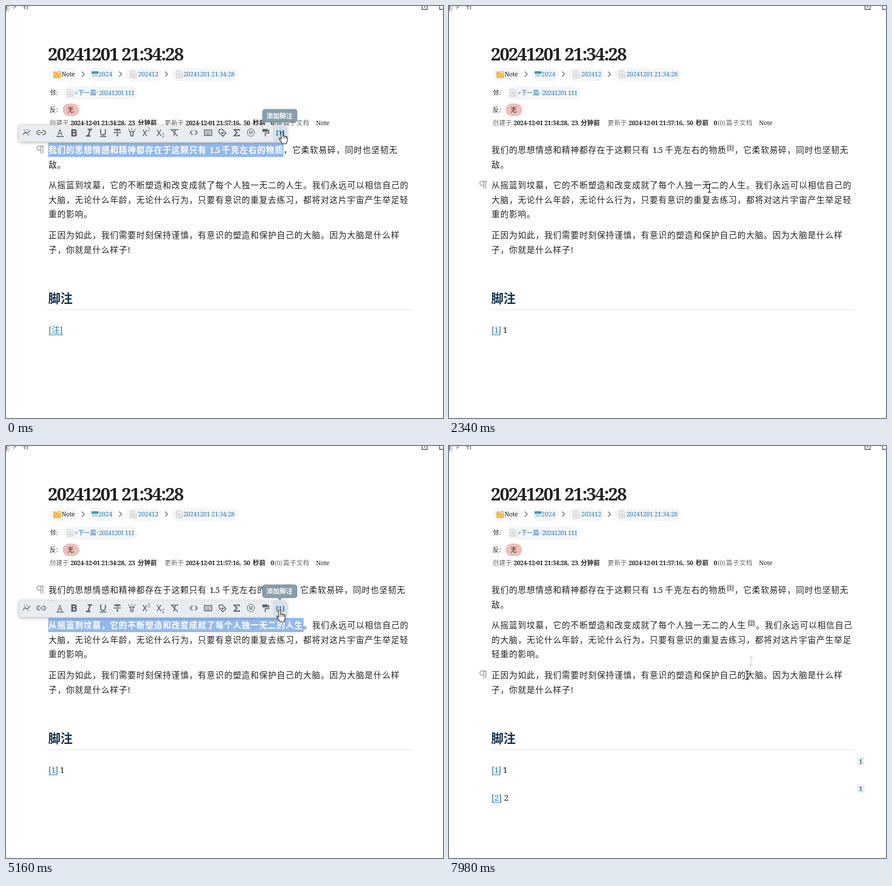
Write an HTML page that moves like this. It is 771 px wide and 726 px high and loops after 8000 ms.

```html
<!DOCTYPE html>
<html lang="zh-CN">
<head>
<meta charset="utf-8">
<title>脚注</title>
<style>
html, body { margin: 0; width: 100%; height: 100%; overflow: hidden; background: #fff; }
svg { display: block; width: 100%; height: 100%; }
text {
  font-family: 'Noto Serif', 'Noto Sans CJK SC', 'Noto Sans CJK', serif;
  white-space: pre; text-spacing-trim: space-all; user-select: none;
}
#panel { filter: drop-shadow(0 9px 14px rgba(0,0,0,.32)); }
#bar { filter: drop-shadow(0 1px 3px rgba(0,0,0,.35)); }
</style>
</head>
<body>
<svg id="stage" viewBox="0 0 771 726" lang="zh-CN"></svg>
<script>
const LOOP = 8000, PITCH = 15.5, LEFT = 75;
const INK = '#222', BLUE = '#2878b4', GREY = '#666', LINK = '#2579a8';

// y is the vertical middle of the glyphs
const txt = (x, y, s, { size = 11, fill = INK, w = 400, ls = 0, extra = '' } = {}) =>
  `<text x="${x}" y="${y + size * .37}" font-size="${size}" fill="${fill}" font-weight="${w}" letter-spacing="${ls}" ${extra}>${s}</text>`;
const rect = (x, y, w, h, fill, r = 0, extra = '') =>
  `<rect x="${x}" y="${y}" width="${w}" height="${h}" rx="${r}" fill="${fill}" ${extra}/>`;
const path = (d, stroke, w = 1.5, fill = 'none', extra = '') =>
  `<path d="${d}" fill="${fill}" stroke="${stroke}" stroke-width="${w}" ${extra}/>`;
const g = (id, body, extra = '') => `<g id="${id}" ${extra}>${body}</g>`;
const line = (x, y, s, o = {}) => txt(x, y, s, { size: 14.6, ls: .9, ...o });
const small = (x, y, s, o = {}) => txt(x, y, s, { ls: -.3, ...o });
const pill = (x, y, w) => rect(x, y, w, 23, '#f4f6f8', 11.5);

const first = '我们的思想情感和精神都存在于这颗只有';
const second = '从摇篮到坟墓，它的不断塑造和改变成就了每个人独一无二的人生';

const opening = o => line(LEFT, 254, first, o) + line(359, 254, '1.5', { ls: -.8, ...o }) + line(381, 254, '千克左右的物质', o);
const sup = (x, y, n) => rect(x, y - 7, 12.5, 13.5, '#dddfe2', 2) + txt(x + .4, y, `[${n}]`, { size: 10, ls: -.3, fill: '#333' });

const sheet = (x, y) =>
  path(`M${x} ${y - 6}h7l3 3v9h-10z`, '#b9bec4', .9, '#f3f3f1') +
  path(`M${x + 2} ${y - 2}h5M${x + 2} ${y + .5}h6M${x + 2} ${y + 3}h6`, '#a9b4bd', .8);
const chevron = x => path(`M${x - 2.5} 115.5l4.5 4.5-4.5 4.5`, '#777', 1.6);

function header() {
  return rect(-8, -12, 15, 23, '#dedede', 5) + path('M1 0v7', '#666', 1.5) +
    path('M12.5 4.5l5-4.5', '#777') +
    path('M33.5 0v6M38 0v6M33.5 1c-4 0-4-2-4-3', '#666', 1.4) +
    path('M734 -3v9h9v-9M738.5 0v3M771 6h-6v-8', '#555', 1.4) +
    txt(74, 85, '20241201 21:34:28', { size: 31, w: 700, ls: -1.85 }) +
    pill(77, 109, 51) + pill(146, 109, 48) + pill(211, 109, 63) + pill(293, 109, 116) + pill(101, 142, 131) +
    path('M84 116h5l1.5 2h6v8.500h-12.500z', '#e5a42c', .6, '#f7bd48') + path('M91 115.500h5v2', '#d9952a', 1) +
    small(98, 120, 'Note') +
    rect(151, 115, 12, 11, '#e2eaec', 1) + rect(151, 115, 12, 4.500, '#3d9bb3', 1) +
    path('M153 122.500h8', '#8f9da4', 1.500, 'none', 'stroke-dasharray="1.500 1"') +
    small(163, 120, '2024', { fill: BLUE, ls: 0 }) +
    sheet(219.5, 120.5) + small(233, 120, '202412', { fill: BLUE, ls: -.2 }) +
    sheet(300.5, 120.5) + small(313, 120, '20241201 21:34:28', { fill: BLUE }) +
    [136, 202, 283].map(chevron).join('') +
    small(77, 153, '邻:', { ls: .5 }) + sheet(108, 153) +
    small(121, 153, '&gt;下一篇·', { fill: BLUE }) + small(164, 153, '20241201 111', { fill: BLUE, ls: -.7 }) +
    small(77, 183, '反:', { ls: .5 }) + rect(100, 172, 29, 22, '#efbfba', 11) + small(108.500, 183, '无', { ls: 0 }) +
    meta(77, '创建于', '2024-12-01 21:34:28,', '23', '分钟前') +
    meta(280, '更新于', '2024-12-01 21:57:16,', '50', '秒前') +
    small(467, 205.500, '0', { w: 700 }) + small(474, 205.500, '(0)', { fill: GREY, ls: -.2 }) +
    small(489, 205.500, '篇子文档', { fill: GREY, ls: .7 }) + small(547, 205.500, 'Note');
}

function meta(x, label, date, n, unit) {
  const y = 205.5, b = { w: 700 };
  return small(x, y, label, { fill: GREY, ls: .4 }) + small(x + 37, y, date, { ...b, ls: -.42 }) +
    small(x + 139, y, n, b) + small(x + 155.5, y, unit, { ...b, ls: .3 });
}

function article() {
  const tailA = '，它柔软易碎，同时也坚韧无', tailB = '。我们永远可以相信自己';
  const mid = '大脑，无论什么年龄，无论什么行为，只要有意识的重复去练习，都将对这片宇宙产生举足';
  return opening() + g('tail1', line(0, 254, tailA)) + g('sup1', sup(490, 250, 1)) + line(LEFT, 280, '敌。') +
    line(LEFT, 316, second) +
    g('flowA', line(524.5, 316, tailB + '的') + line(LEFT, 341.5, mid + '轻') + line(LEFT, 367, '重的影响。')) +
    g('flowB', sup(527, 312, 2) + line(541.5, 316, tailB) + line(LEFT, 341.5, '的' + mid) + line(LEFT, 367, '轻重的影响。')) +
    line(LEFT, 404, '正因为如此，我们需要时刻保持谨慎，有意识的塑造和保护自己的大脑。因为大脑是什么样') +
    line(LEFT, 429.5, '子，你就是什么样子!') +
    txt(74.500, 515, '脚注', { size: 21.500, w: 700, fill: '#12304f' }) + rect(71, 534.500, 646, 1, '#e2e3e6') +
    note(1, 571) + g('row2', note(2, 619.5));
}

function note(n, y) {
  const w = n > 1 ? 18 : 16, o = { size: 14.6, fill: LINK, w: 500 };
  return g('raw' + n, txt(LEFT, y, '[注]', o) + rect(LEFT, y + 8, 26, 1, LINK)) +
    g('ref' + n, txt(LEFT, y, `[${n}]`, { ...o, ls: n > 1 ? -.2 : -.7 }) + rect(LEFT, y + 8, w, 1, LINK)) +
    g('body' + n, txt(LEFT + w + 4, y, n, { size: 14.6 })) +
    g('badge' + n, rect(720.500, y - 23, 12, 15, '#e9ecef', 3) + txt(723.300, y - 15.500, '1', { size: 11, w: 600, fill: '#2b7d8c' }));
}

function toolbar() {
  const c = '#59606a', y = 223;
  const ch = (x, s, o = {}) => txt(x, y, s, { size: 17, w: 700, fill: c, extra: 'text-anchor="middle" style="font-family:Roboto,sans-serif"', ...o });
  const ink = (d, w = 1.6) => path(d, c, w);
  return g('bar', rect(23, 210, 472, 29, '#e9edf1', 4)) +
    g('hot', rect(471, 210, 24, 29, '#d5e1ea', 4)) +
    ink('M30 227l4-5 3 3 6-6M32 218l1 2M39 228l1-2M37 217v2', 1.4) +
    ink('M60 219.500h-2a3.500 3.500 0 0 0 0 7h2M64 219.500h2a3.500 3.500 0 0 1 0 7h-2M59 223h6') +
    ch(95, 'A', { size: 14, w: 400 }) + ink('M89 230h13') +
    ch(120, 'B', { size: 18, w: 900 }) +
    path('M144 217.500h8M141 229h8M148.500 218l-3.500 11', c, 2.4) +
    path('M167 217v6a4.200 4.200 0 0 0 8.400 0v-6', c, 1.9) + ink('M165.500 230h11.500') +
    path('M191 218h11M196.500 218v3M196.500 225v4.500', c, 2.4) + ink('M190 223h13') +
    ink('M218 221h8l-2 3v5h-4v-5zM222 216v2M216 217l1.500 1.500M228 217l-1.500 1.500') +
    ch(245, 'X', { size: 15, w: 400 }) + txt(250, 218.500, '2', { size: 8, fill: c }) +
    ch(270, 'X', { size: 15, w: 400 }) + txt(275, 228.500, '2', { size: 8, fill: c }) +
    ink('M293 218h11M299 218l-3 11M291 217l12 12.500') +
    ink('M329 219l-4 4 4 4M333.500 219l4 4-4 4') +
    ink('M350 218.500h13v9.500h-13z', 1.4) + path('M352 221.500h9M352 224h9', c, 1.4, 'none', 'stroke-dasharray="1.400 1"') + ink('M353.500 226.300h6', 1) +
    ink('M376 218v5l6.500 6.500 5.500-5.500-6.500-6.500h-5z') + path('M382 226l-2.500-2.700q1-2 2.500-.4 1.500-1.600 2.500.4z', 'none', 0, c) +
    path('M411.500 220v-2h-9l5 5-5 5.500h9v-2', c, 2) +
    `<circle cx="432" cy="223" r="6.500" fill="none" stroke="${c}"/>` + ch(432, 'M', { size: 8.500, w: 400 }) +
    path('M453 217.500h8v3.500h-8z', c, 1.4, c) + ink('M461 219h2.500v5h-6v6', 1.700) +
    txt(476.300, y, '[1]', { size: 11.500, w: 700, fill: LINK, ls: -.3 });
}

const tooltip = () =>
  rect(452, 181.5, 62, 24, '#8199a7', 5) + path('M478 205h10l-5 4.500z', 'none', 0, '#8199a7') +
  txt(459.5, 193.5, '添加脚注', { size: 11.5, w: 700, fill: '#fff' });

function dialog() {
  return g('panel', rect(231, 310, 389, 248.5, '#fff', 4)) +
    txt(402, 321.500, '添加脚注', { size: 12.500, ls: .8, fill: '#333' }) + rect(231, 332, 389, 1, '#ececec') +
    path('M601 315l13 13M614 315l-13 13', '#333', 2.2) +
    rect(247, 340, 7.500, 57, '#ebebeb') +
    g('quote1', line(264, 360, first) + line(548, 360, '1.5', { ls: -.8 }) + line(569, 360, '千') + line(264, 381, '克左右的物质')) +
    g('quote2', line(264, 360, second.slice(0, 21)) + line(264, 381, second.slice(21))) +
    txt(247, 424, '脚注内容:', { size: 14.600, w: 700, ls: .6 }) +
    rect(247.500, 437.500, 356, 113, '#fff', 0, 'stroke="#858585"') +
    g('type1', txt(255, 456.5, '1', { size: 14.6 })) + g('type2', txt(255, 456.5, '2', { size: 14.6 })) +
    path('M611 557.500l7-7M615 557.500l3-3', '#555', 1.2);
}

const beam = c => path('M-3 -7.500q3 0 3 1.500q0 -1.500 3 -1.500M0 -6v12M-3 7.500q3 0 3 -1.500q0 1.500 3 1.500', c, 1.3);
const hand = path('M-1.700 11V1.500a1.700 1.700 0 0 1 3.400 0V8c.3-1.400 2.800-1.200 3 .3 .4-1.200 2.500-1 2.700.6 .5-1 2-.6 2 .9V14c0 2.600-1.400 3.600-1.700 6.800H.2C-.2 17.800-3.800 15.600-5.200 12c-.5-2 1.500-2.400 3.500.6z', '#222', 1.1, '#fff') +
  path('M1.700 8v4M4.700 8.500v3.500M7.400 9.500v2.500', '#222', .8);

const selected = (id, y, body) =>
  `<clipPath id="${id}Clip"><rect id="${id}Win" x="74.500" y="${y}" width="415" height="25"/></clipPath>` +
  g(id, g(id + 'Body', rect(0, y, 771, 25, '#94b9ec') + body, `clip-path="url(#${id}Clip)"`));
const white = { fill: '#fff', w: 700 };

document.getElementById('stage').innerHTML =
  rect(0, 0, 771, 726, '#fff') + header() + article() +
  selected('selA', 241, opening(white)) + selected('selB', 303, line(LEFT, 316, second, white)) +
  g('mark', path('M60.500 -6.500h6M61.500 -6.500v13M65 -6.500v13', '#999', 1.4) +
    path('M61.500 -6.500h-3.500a3.500 3.500 0 0 0 0 7h3.500', '#999', 1.4)) +
  g('tools', toolbar() + g('tip', tooltip(), 'opacity=".94"')) +
  g('dim', rect(0, 0, 771, 726, '#000', 0, 'opacity=".105"')) + g('dialog', dialog()) +
  g('trace', beam('#000'), 'transform="translate(533 379)" opacity=".17"') +
  g('cursor', '<circle id="press" cx="1" cy="0" r="11.500" fill="#f2ec1c" opacity=".8"/>' + g('hand', hand) + g('beam', beam('#222')));

const el = {};
document.querySelectorAll('[id]').forEach(n => el[n.id] = n);
const show = (id, on) => { el[id].style.display = on ? '' : 'none'; };
const within = (t, ...spans) => spans.some(([a, b]) => t >= a && t < b);
const ramp = (t, a, b) => { const k = Math.min(1, Math.max(0, (t - a) / (b - a))); return k * k * (3 - 2 * k); };

// time, x, y
const route = [
  [0, 487, 222], [130, 487, 222], [340, 533, 375], [540, 533, 375], [1300, 609, 327], [1650, 609, 327],
  [2130, 515, 322], [2340, 460, 321], [2600, 338, 318], [2970, 525, 317], [3030, 525, 317],
  [3390, 138, 317], [3650, 80, 316], [3990, 80, 316], [4120, 94, 315], [4390, 94, 315],
  [4700, 260, 243], [4950, 420, 268], [5160, 483, 289], [5450, 483, 289], [5980, 533, 379], [6050, 533, 379],
  [6810, 612, 313], [7080, 612, 313], [7630, 405, 411], [7980, 526, 404], [8000, 526, 404]
];
function place(t) {
  const i = route.findIndex(p => p[0] > t), [a, x, y] = route[i - 1], [b, u, v] = route[i], k = (t - a) / (b - a);
  return [x + (u - x) * k, y + (v - y) * k];
}

function draw(t) {
  const [x, y] = place(t);

  el.tail1.setAttribute('transform', `translate(${t < 610 ? 489.5 : 503.5})`);
  show('sup1', t >= 610);
  show('raw1', t < 610);
  show('ref1', t >= 610);
  show('body1', t >= 1720);
  show('flowA', t < 6120);
  show('flowB', t >= 6120);
  show('row2', t >= 5430);
  show('raw2', t < 6120);
  show('ref2', t >= 6120);
  show('body2', t >= 7150);
  show('badge1', t >= 7350);
  show('badge2', t >= 7350);

  show('selA', t < 200);
  show('selB', within(t, [3030, 5600]));
  const from = t < 3650 ? LEFT + PITCH * Math.max(0, Math.round((x - LEFT) / PITCH)) : LEFT;
  el.selBWin.setAttribute('x', from - .5);
  el.selBWin.setAttribute('width', Math.max(0, 525.5 - from));

  show('mark', within(t, [0, 200], [2060, 3100], [4600, 5560], [7560, LOOP]));
  el.mark.setAttribute('transform', `translate(0 ${within(t, [2060, 3100]) ? 315.5 : t > 7000 ? 403 : 253.5})`);

  show('tools', within(t, [0, 150], [4460, 5560]));
  el.tools.setAttribute('transform', `translate(0 ${t < 1000 ? 0 : 62.5})`);
  const hover = t < 150 || t >= 5090;
  show('tip', hover);
  show('hot', hover);

  const open = ramp(t, 130, 340) - ramp(t, 1650, 1860) + ramp(t, 5560, 5770) - ramp(t, 7080, 7290);
  const s = .8 + .2 * open;
  el.dim.setAttribute('opacity', open);
  el.dialog.setAttribute('opacity', open);
  el.dialog.setAttribute('transform', `translate(425.5 434) scale(${s}) translate(-425.5 -434)`);
  show('dialog', open > 0);
  show('quote1', t < 4000);
  show('quote2', t >= 4000);
  show('type1', within(t, [820, 4000]));
  show('type2', t >= 6330);

  const point = within(t, [0, 200], [1230, 1720], [4950, 5600], [6740, 7150]);
  show('hand', point);
  show('beam', !point);
  show('press', within(t, [1440, 1650], [3030, 3990], [5230, 5400], [6880, 7080]));
  show('trace', t >= 6050);
  el.cursor.setAttribute('transform', `translate(${x} ${y})`);
}

const start = performance.now();
function tick() {
  draw((performance.now() - start) % LOOP);
  requestAnimationFrame(tick);
}
draw(0);
requestAnimationFrame(tick);
</script>
</body>
</html>
```
